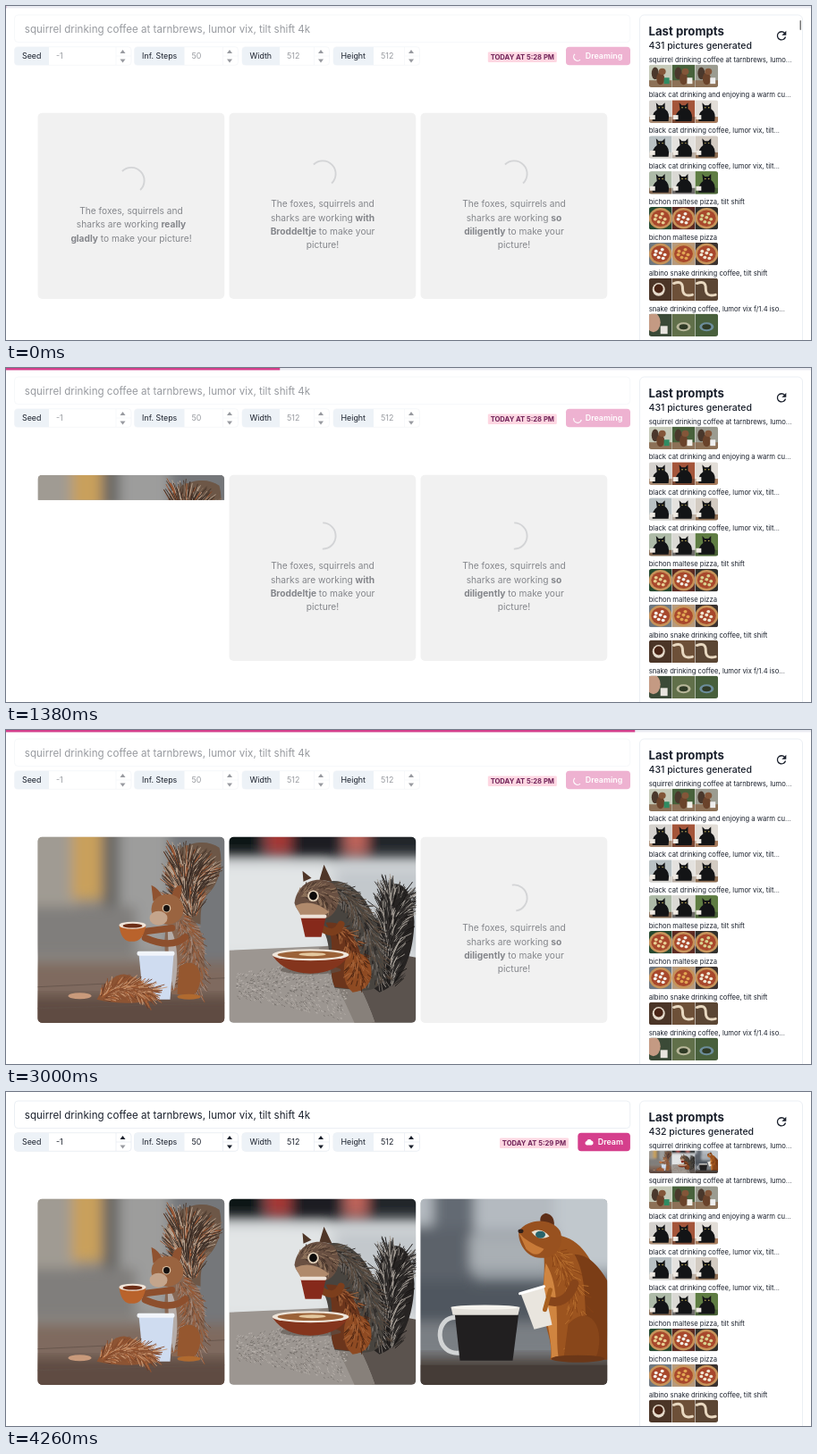
Recreate the animation shown at these times as an HTML page. Size 900x374 px, loop 4.34 s.

```html
<!DOCTYPE html>
<html lang="en">
<head>
<meta charset="utf-8">
<title>Picture generator</title>
<style>
html, body { margin: 0; height: 100%; overflow: hidden; background: #fff; }
#stage { display: block; width: 900px; height: 374px; font-family: Inter, "Open Sans", sans-serif; }
</style>
</head>
<body>
<svg id="stage" viewBox="0 0 900 374"></svg>
<script>
const LOOP = 4340, BAR_OFF = 3850, DONE = 3880, LIST = 3960;
const PHOTO_AT = [1365, 2580, 3820], STRIP = 28, STRIP_MS = 40;
const CARD_X = [35.5, 249.5, 463.5];
const INK = '#1a202c', PINK = '#d53f8c', LINE = '#e2e8f0';

// Shape helpers
const text = (x, y, size, str, fill = INK, more = '') =>
  `<text x="${x}" y="${y}" font-size="${size}" fill="${fill}" ${more}>${str}</text>`;
const rect = (x, y, w, h, fill, more = '') =>
  `<rect x="${x}" y="${y}" width="${w}" height="${h}" fill="${fill}" ${more}/>`;
const oval = (x, y, rx, ry, fill, more = '') =>
  `<ellipse cx="${x}" cy="${y}" rx="${rx}" ry="${ry}" fill="${fill}" ${more}/>`;
const path = (d, fill, more = '') => `<path d="${d}" fill="${fill}" ${more}/>`;
const line = (d, stroke, width) =>
  path(d, 'none', `stroke="${stroke}" stroke-width="${width}" stroke-linecap="round"`);
const group = (body, more = '') => `<g ${more}>${body}</g>`;
const blur = body => group(body, 'filter="url(#soft)"');
const arc = (id, r, color, width) => `<path class="${id}" d="M${-r} 0A${r} ${r} 0 0 1 ${r} 0"
  fill="none" stroke="${color}" stroke-width="${width}"/>`;

let seed = 11;
const rnd = () => (seed = seed * 16807 % 2147483647) / 2147483647;

// Hairs that follow a quadratic spine and fan out towards its sides
function fur(n, [x0, y0, x1, y1, x2, y2], width, len, colors) {
  return colors.map(color => {
    let d = '';
    for (let i = 0; i < n; i++) {
      const u = rnd(), v = 1 - u, side = rnd() - .5, l = len * (.4 + .6 * rnd());
      const dir = Math.atan2(v * (y1 - y0) + u * (y2 - y1), v * (x1 - x0) + u * (x2 - x1));
      const off = side * width * (.4 + .6 * u), a = dir + side * 1.9 + (rnd() - .5) * .5;
      const x = v * v * x0 + 2 * u * v * x1 + u * u * x2 - off * Math.sin(dir);
      const y = v * v * y0 + 2 * u * v * y1 + u * u * y2 + off * Math.cos(dir);
      d += `M${x.toFixed(1)} ${y.toFixed(1)}l${(l * Math.cos(a)).toFixed(1)} ${(l * Math.sin(a)).toFixed(1)}`;
    }
    return line(d, color, .9);
  }).join('');
}

const photos = [
  () => rect(0, 0, 209, 208, '#8e8b86') +
    blur(rect(-20, -20, 65, 150, '#a09b93') + rect(38, -20, 34, 90, '#c9a05c') +
      rect(72, -20, 20, 130, '#696765') + rect(92, -20, 55, 150, '#9d9d9c') +
      rect(147, -20, 80, 160, '#75777a') + rect(-20, 78, 130, 55, '#807e7c') +
      rect(-20, 140, 250, 90, '#7f6a5f')) +
    blur(rect(-20, 178, 250, 50, '#5f4c43')) +
    line('M0 168L209 158M0 192L209 186', '#63524a', .8) +
    path('M165 92C156 66 134 50 146 28C156 8 186 0 203 12C209 34 200 56 190 64C182 74 182 84 182 98Z', '#6d5747') +
    fur(150, [172, 90, 160, 55, 174, 28], 44, 22, ['#4b382c', '#8b7462', '#9c5530', '#b9a592', '#3b2d25']) +
    path('M152 84C177 86 189 108 186 138C187 160 182 172 172 178L150 176C146 150 138 125 144 100Z', '#876753') +
    fur(110, [160, 92, 186, 125, 168, 174], 34, 8, ['#6e4a36', '#a5897a', '#9a5b36']) +
    path('M145 98C158 112 158 150 152 172L147 150Z', '#b5aca8') +
    path('M158 145C180 130 190 160 174 178L156 176Z', '#95572f') +
    path('M129 72L127 54Q136 58 140 68ZM150 66Q152 54 161 54Q161 66 157 74Z', '#8f5230') +
    oval(145, 81, 18, 17, '#9a6440') + oval(135, 91, 10, 8, '#c4a58c') +
    oval(144, 80, 4.8, 4.8, '#d9c0a4') + oval(144, 80, 3.5, 3.7, '#15100e') +
    line('M165 112Q150 126 120 113M150 102L118 106', '#8d4f2d', 7.5) +
    path('M91 99H121Q118 116 108 117H102Q93 115 91 99Z', '#b9632c') +
    oval(106, 99, 15, 4, '#f1e5da') + oval(106, 99.5, 11, 2.4, '#6c2d16') +
    path('M113 131H152L148 182H118Z', '#cfdcf0') + rect(111, 128, 42, 5, '#f1f5fb', 'rx="2"') +
    path('M66 182Q82 152 98 154Q122 160 134 182Q100 190 66 182Z', '#8d5433') +
    fur(90, [72, 180, 95, 160, 130, 178], 20, 12, ['#6b3d26', '#b0673a', '#c99873', '#8a4f2f']) +
    oval(47, 178, 13, 3.5, '#c99a7b') + oval(169, 179, 13, 3, '#b06a2f'),

  () => rect(0, 0, 209, 208, '#d5d9db') +
    blur(rect(-20, -20, 250, 44, '#4a4d52') + rect(-20, -20, 56, 40, '#101214') +
      rect(42, -20, 26, 38, '#a63834') + rect(70, -20, 55, 44, '#1b1e21') +
      rect(130, -20, 24, 38, '#c0635a') + rect(156, -20, 80, 40, '#24282b') +
      rect(-20, 32, 130, 100, '#e2e5e6') + rect(120, 36, 110, 90, '#c3c8cc')) +
    path('M118 118L209 135V208H160Z', '#5b534e') +
    path('M0 127L112 122Q142 148 163 208H0Z', '#9c9691') +
    path('M112 122Q142 148 163 208H140Q118 160 100 124Z', '#87807a') +
    fur(350, [8, 167, 70, 166, 132, 172], 68, 1.4, ['#77716c', '#b9b3ad']) +
    path('M160 168C172 140 158 100 172 62C186 42 206 54 207 95C206 135 192 166 168 174Z', '#262322') +
    fur(160, [178, 168, 172, 105, 192, 58], 40, 16, ['#171514', '#3b3735', '#aaa39b', '#2a2726']) +
    path('M98 55C130 36 158 68 168 108C177 150 176 172 150 172L118 169C108 140 118 115 98 95Z', '#48443f') +
    fur(150, [112, 56, 160, 70, 164, 165], 32, 10, ['#2b2826', '#77706a', '#5b4a3d']) +
    path('M108 96C142 92 154 138 148 172L118 168C108 145 122 120 108 96Z', '#6b351c') +
    path('M132 130Q160 126 159 154Q157 172 138 174Q122 160 132 130Z', '#8e4a22') +
    fur(70, [118, 100, 150, 120, 142, 166], 26, 8, ['#4a2412', '#a9663a']) +
    path('M101 48L106 31L115 50ZM83 50L82 38L92 46Z', '#4f3628') +
    path('M73 74C76 52 96 42 116 52C128 66 122 88 106 92C90 94 76 86 73 74Z', '#695042') +
    fur(60, [80, 66, 100, 52, 118, 78], 24, 6, ['#453329', '#94785f']) +
    path('M74 77Q92 68 112 84Q96 96 80 88Z', '#b08a6c') +
    oval(94, 66, 6.3, 6.3, '#e5d4bd') + oval(94, 66, 4.4, 4.7, '#0d0b0a') +
    line('M125 98Q118 114 100 100', '#7c3e1c', 8) +
    path('M80 90H108L103 112H85Z', '#86291b') + rect(79, 87, 30, 4, '#eee2d8', 'rx="2"') +
    oval(91, 149, 34, 5, '#5a524c', 'opacity=".6"') +
    path('M48 132H134Q122 152 91 153Q60 152 48 132Z', '#84351d') +
    oval(91, 132, 43, 6.5, '#eee5da') + oval(91, 132, 37, 4.3, '#9b6238') +
    oval(93, 131.5, 15, 2, '#e4c89f'),

  () => rect(0, 0, 209, 208, '#8d949b') +
    blur(rect(-20, -20, 250, 56, '#b4bac0') + rect(-20, 30, 80, 66, '#5b626b') +
      rect(14, -20, 46, 52, '#646b73') + rect(55, 40, 90, 40, '#a9afb4') +
      rect(-20, 92, 250, 46, '#4f565f') + rect(150, -20, 90, 100, '#c1c8cd') +
      rect(-20, 138, 250, 40, '#7a7f84')) +
    blur(rect(-20, 176, 250, 60, '#4d443f')) + rect(0, 186, 209, 22, '#453c37') +
    path('M136 42C172 34 190 62 200 92C210 120 211 152 206 180H145C150 158 134 138 136 108C138 90 140 72 136 42Z', '#9c541f') +
    path('M172 62C190 92 180 140 190 180H209V92C200 76 188 62 172 62Z', '#7b3d16') +
    path('M140 72C158 100 150 150 154 176L146 178C148 150 132 120 140 72Z', '#d08540') +
    fur(70, [150, 60, 180, 100, 182, 172], 34, 10, ['#874317', '#b8702f']) +
    path('M165 140C190 115 208 146 196 178H160Z', '#88461a') +
    path('M135 30Q131 18 140 16Q151 18 149 32Z', '#5e2f18') +
    path('M110 36C119 22 146 20 156 36C162 52 150 68 134 66C118 66 108 48 110 36Z', '#98511f') +
    path('M110 38Q118 48 138 56Q130 68 118 56Z', '#c87a38') + oval(112, 36, 3, 2.3, '#30201a') +
    path('M124 37Q135 31 144 42Q132 48 124 37Z', '#e8e1d3') + oval(134, 40, 5.5, 4, '#28646b') +
    line('M172 95Q162 122 140 113', '#86441a', 10) +
    line('M41 133C14 130 15 178 46 172', '#d2d4d5', 5) +
    path('M38 126H110L103 181H44Z', '#211f20') + path('M34 121H111L109 130H36Z', '#e3e0da') +
    oval(72, 121.5, 38, 2.6, '#f6f4ef') +
    path('M112 106L138 99L147 141L127 146Z', '#e9e5de') + line('M111 106L138 98', '#fff', 3) +
    line('M139 124L145 102', '#a9601f', 5) + oval(176, 179, 30, 4, '#6b3718')
];

// Small preview tiles, 26 units square
const tiles = {
  squirrel: (bg, cup) => rect(0, 0, 26, 26, bg) + rect(0, 18, 26, 8, '#8d7157') +
    oval(7, 10, 4, 7, '#4a382c') + oval(13, 16, 4.5, 7, '#6a432b') + oval(15, 8, 4, 3.6, '#835639') +
    rect(17, 15, 6, 7, cup),
  cat: (bg, floor) => rect(0, 0, 26, 26, bg) + rect(0, 19, 26, 7, floor) +
    path('M4 24Q3 15 9 11L8 3L11 6H15L18 3V10Q24 14 22 24Z', '#131416') +
    oval(11.5, 8.5, .8, .7, '#c7b35c') + oval(15.5, 8.5, .8, .7, '#c7b35c') + rect(1, 17, 6, 5, '#eee9e2'),
  pizza: (bg, top) => rect(0, 0, 26, 26, bg) + oval(13, 13, 13, 12, '#c6935a') + oval(13, 13, 10.5, 9.5, '#a8482c') +
    [[8, 10], [15, 8], [18, 14], [11, 17], [13, 12], [7, 14], [16, 18]].map(p => oval(...p, 2, 1.8, top)).join(''),
  cup: bg => rect(0, 0, 26, 26, bg) + oval(11, 13, 7, 7.5, '#e5dacb') + oval(11, 12, 5, 5, '#4a2516'),
  snake: bg => rect(0, 0, 26, 26, bg) + line('M2 6Q12 2 12 12T23 19', '#e8d8c0', 3),
  leaf: (bg, c) => rect(0, 0, 26, 26, bg) + oval(13, 15, 8, 5, c) + oval(13, 15, 5, 3, '#2f3a25'),
  face: () => rect(0, 0, 26, 26, '#3b4a37') + oval(5, 10, 8, 11, '#c49a83') + rect(13, 14, 8, 9, '#e8e5df'),
  photo: i => `<use href="#photo${i}" transform="scale(.125)"/>`
};

const prompts = [
  ['squirrel drinking coffee at tarnbrews, lumo...', ['photo', 0], ['photo', 1], ['photo', 2]],
  ['squirrel drinking coffee at tarnbrews, lumo...', ['squirrel', '#c5c9b8', '#2f8b62'], ['squirrel', '#48623c', '#f0eee8'], ['squirrel', '#9b9c91', '#eee']],
  ['black cat drinking and enjoying a warm cu...', ['cat', '#d5d2ce', '#a88a72'], ['cat', '#a4553a', '#7c4a35'], ['cat', '#e2ddd7', '#a77b5c']],
  ['black cat drinking coffee, lumor vix, tilt...', ['cat', '#b9c1c4', '#d6d2cc'], ['cat', '#e4e2df', '#b9aea4'], ['cat', '#d3cbc2', '#8d6d52']],
  ['black cat drinking coffee, lumor vix, tilt...', ['cat', '#aebba8', '#826650'], ['cat', '#dad9d4', '#6d6a68'], ['cat', '#5f7d43', '#4b6338']],
  ['bichon maltese pizza, tilt shift', ['pizza', '#26492f', '#e8cf92'], ['pizza', '#5d2a22', '#f2ede4'], ['pizza', '#31302c', '#d8d18d']],
  ['bichon maltese pizza', ['pizza', '#6f7880', '#f4f1eb'], ['pizza', '#b79a7c', '#e1a653'], ['pizza', '#3c3330', '#efe6d2']],
  ['albino snake drinking coffee, tilt shift', ['cup', '#4b3527'], ['snake', '#6d5038'], ['snake', '#5b4634']],
  ['snake drinking coffee, lumor vix f/1.4 iso...', ['face'], ['leaf', '#61704a', '#b8b79a'], ['leaf', '#48603c', '#6c8d9b']]
];

const item = ([title, ...cells], i) => {
  const y = 39.86 * i;
  const strip = cells.map(([kind, ...args], k) =>
    `<svg x="${25.8 * k}" width="25.8" height="25.6" viewBox="0 0 26 26" preserveAspectRatio="none">${tiles[kind](...args)}</svg>`).join('');
  return text(718.7, 62.6 + y, 7.65, title) +
    group(strip, `transform="translate(718.8 ${65.5 + y})" clip-path="url(#thumb)"`);
};
const sidebar = (id, count, list) => group(
  text(718.5, 47.6, 10.5, `${count} pictures generated`, INK, 'font-weight="500"') +
  list.slice(0, 8).map(item).join(''), `id="${id}"`);

const fields = [
  ['Seed', 9.5, 48, 140, '-1'], ['Inf. Steps', 143.5, 199.5, 259.5, '50'],
  ['Width', 264, 306, 361.5, '512'], ['Height', 366, 411, 462.5, '512']
];
const field = ([name, x, mid, end, value]) => {
  const ax = end - 9.5;
  return rect(x, 45.7, end - x, 20.6, '#fff', `rx="3.5" stroke="${LINE}" stroke-width=".7" class="dim"`) +
    path(`M${mid} 46H${x + 3.5}Q${x} 46 ${x} 49.5V62.5Q${x} 66 ${x + 3.5} 66H${mid}Z`, '#edf2f7') +
    text(x + 8.5, 59.4, 8.9, name) +
    group(text(mid + 8, 59.4, 8.9, value) +
      path(`M${end - 17} 46V66M${end - 17} 56H${end}`, 'none', `stroke="${LINE}" stroke-width=".6"`) +
      path(`M${ax - 3} 53L${ax} 49L${ax + 3} 53Z`, INK), 'class="dim"') +
    path(`M${ax - 3} 59.5L${ax} 63.5L${ax + 3} 59.5Z`, INK, name === 'Seed' ? 'opacity=".45"' : 'class="dim"');
};

const badge = (x, time) => rect(x, 51.5, 77, 11.5, '#fed7e2', 'rx="1.3"') +
  text(x + 38.5, 60.1, 7.65, `TODAY AT ${time} PM`, '#702459', 'font-weight="700" text-anchor="middle"');

const bold = s => `<tspan font-weight="700">${s}</tspan>`;
const waiting = [
  ['sharks are working ' + bold('really'), bold('gladly') + ' to make your picture!'],
  ['sharks are working ' + bold('with'), bold('Broddeltje') + ' to make your', 'picture!'],
  ['sharks are working ' + bold('so'), bold('diligently') + ' to make your', 'picture!']
];
const card = (lines, i) => {
  const cx = CARD_X[i] + 104.5, top = i ? 188 : 195.5;
  return group(rect(CARD_X[i], 119.7, 208.7, 208.3, '#f1f1f1', 'rx="5"') +
    group(arc('spin', 14.6, '#d3d4d6', 1.9), `transform="translate(${cx} ${top})"`) +
    ['The foxes, squirrels and', ...lines].map((s, k) =>
      text(cx, top + 37.4 + 15.3 * k, 10.2, s, '#84868b', 'text-anchor="middle"')).join(''), `id="card${i}"`);
};

const stage = document.getElementById('stage');
stage.innerHTML = `<defs>
  <filter id="soft" x="-10%" y="-10%" width="120%" height="120%"><feGaussianBlur stdDeviation="7"/></filter>
  <clipPath id="thumb">${rect(0, 0, 77.3, 25.6, '#000', 'rx="3"')}</clipPath>
  <clipPath id="frame">${rect(0, 0, 208.7, 208.3, '#000', 'rx="5"')}</clipPath>
  ${photos.map((draw, i) => `<g id="photo${i}">${draw()}</g>`).join('')}
  </defs>` +
  group(rect(0, 0, 900, 2.4, '#ebecf2') + `<rect id="bar" height="2.4" fill="${PINK}"/>`, 'id="progress"') +
  rect(9.5, 10, 688.2, 30.6, '#fff', `rx="4" stroke="${LINE}" stroke-width=".7" class="dim"`) +
  group(text(20.8, 29.6, 11.6, 'squirrel drinking coffee at tarnbrews, lumor vix, tilt shift 4k'), 'class="dim"') +
  fields.map(field).join('') +
  group(badge(538.8, '5:28') + rect(626, 45.7, 72, 20.6, '#eeb2d1', 'rx="3.8"') +
    group(arc('turn', 4.3, '#fff', 1.2), 'transform="translate(639 57)"') +
    text(647.8, 59.3, 8.9, 'Dreaming', '#fff', 'font-weight="600"'), 'id="busy"') +
  group(badge(552, '5:29') + rect(639.3, 45.7, 58.6, 20.6, PINK, 'rx="3.8"') +
    path('M649.2 59.4A2.2 2.2 0 0 1 649.2 55.1A3 3 0 0 1 654.6 54.5A2.5 2.5 0 0 1 654.6 59.4Z', '#fff') +
    text(661.8, 59.3, 8.9, 'Dream', '#fff', 'font-weight="600"'), 'id="ready"') +
  waiting.map(card).join('') +
  CARD_X.map((x, i) => `<svg id="shot${i}" x="${x}" y="119.7" width="208.7" height="208.3">
    <g clip-path="url(#frame)"><use href="#photo${i}"/></g></svg>`).join('') +
  rect(708.5, 10, 182, 380, '#fff', `rx="5" stroke="${LINE}" stroke-width=".7"`) +
  text(718.5, 33, 13.2, 'Last prompts', INK, 'font-weight="700"') +
  path('M870.6 30.4A4.6 4.6 0 1 0 871.5 34.5', 'none', `stroke="${INK}" stroke-width="1.3"`) +
  path('M872.3 27.8V32.8H867.3Z', INK) +
  sidebar('before', 431, prompts.slice(1)) + sidebar('after', 432, prompts) +
  rect(887.5, 16, 1.5, 11, '#777', 'id="thumbBar" rx=".7"');

const get = id => document.getElementById(id);
const show = (id, on) => get(id).style.display = on ? '' : 'none';
const all = (sel, fn) => stage.querySelectorAll(sel).forEach(fn);

// Piecewise linear value at time t
function along(t, times, values) {
  let i = 1;
  while (i < times.length - 1 && t > times[i]) i++;
  const u = Math.min(1, (t - times[i - 1]) / (times[i] - times[i - 1]));
  return values[i - 1] + u * (values[i] - values[i - 1]);
}
const KEYS = [0, 640, 1380, 2400, 3000, 3600, 3820];
const BAR = [0, 138, 306, 564, 703, 847, 900];
const SPIN = [45, 810, 1530, 2385, 2960, 3600, 3830];
const TURN = [225, 910, 1630, 2430, 3105, 3690, 3910];

function draw(t) {
  const done = t >= DONE;
  get('bar').setAttribute('width', along(t, KEYS, BAR));
  show('progress', t < BAR_OFF);
  show('busy', !done);
  show('ready', done);
  show('before', t < LIST);
  show('after', t >= LIST);
  show('thumbBar', t < 400);
  all('.dim', el => el.style.opacity = done ? 1 : .45);
  all('.spin', el => el.setAttribute('transform', `rotate(${along(t, KEYS, SPIN)})`));
  all('.turn', el => el.setAttribute('transform', `rotate(${along(t, KEYS, TURN)})`));
  PHOTO_AT.forEach((at, i) => {
    show('card' + i, t < at);
    show('shot' + i, t >= at);
    get('shot' + i).setAttribute('height', t < at + STRIP_MS ? STRIP : 208.3);
  });
}

const start = performance.now();
function tick() {
  draw((performance.now() - start) % LOOP);
  requestAnimationFrame(tick);
}
tick();
</script>
</body>
</html>
```
